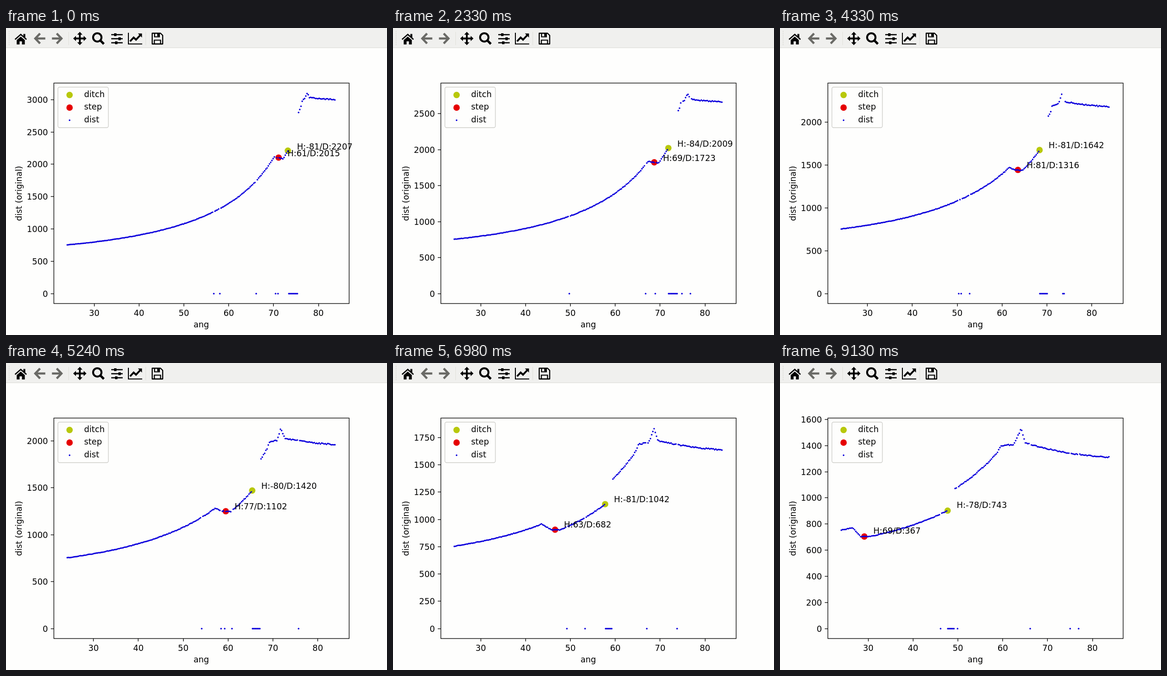
These frames come from a looping animation (800x644 px, 9170 ms). An HTML page with a canvas:

```html
<!DOCTYPE html>
<html lang="en">
<head>
<meta charset="utf-8">
<title>Distance scan</title>
<style>
  html, body { margin: 0; width: 100%; height: 100%; overflow: hidden; background: #fefefd; }
  canvas, svg { position: absolute; left: 0; top: 0; display: block; }
  .line { fill: none; stroke: #000; }
</style>
</head>
<body>
<canvas id="plot" width="800" height="644"></canvas>
<svg width="800" height="43" viewBox="0 0 800 43">
  <rect width="800" height="41.5" fill="#f0f0ee"/>
  <path d="M0 41.5H800" stroke="#dcdcd6"/>
  <path d="M6.5 6V38" stroke="#cfcfc8" stroke-dasharray="2 2"/>
  <path d="M131.5 8V36M293.5 8V36" stroke="#e0e0da"/>
  <!-- home -->
  <path class="line" d="M19 24L31 13.5L43 24" stroke-width="2.6"/>
  <path d="M36.5 12.5H40.5V21L36.5 17.5ZM22.5 25.3L31 18L39.5 25.3V34.5H33.5V28H28.5V34.5H22.5Z"/>
  <!-- back, forward -->
  <g fill="none" stroke="#6a6a66" stroke-width="4.6">
    <path d="M71.5 11.5L61.5 22L71.5 32.5M62 22H82.5"/>
    <path d="M106.5 11.5L116.5 22L106.5 32.5M116 22H96.5"/>
  </g>
  <!-- pan -->
  <path class="line" d="M155 12V32M145 22H165" stroke-width="3.8"/>
  <path d="M155 8L160.5 14H149.5ZM155 36L160.5 30H149.5ZM141 22L147 16.5V27.5ZM169 22L163 16.5V27.5Z"/>
  <!-- zoom -->
  <circle class="line" cx="191.7" cy="19.7" r="8.8" stroke-width="4"/>
  <path class="line" d="M198 26L205.5 33.5" stroke-width="4.8"/>
  <!-- sliders -->
  <path class="line" d="M221 14H245M221 22.5H245M221 31H245" stroke-width="2.3"/>
  <path d="M227 11h5v6h-5zM236 19.5h5v6h-5zM229 28h5v6h-5z"/>
  <!-- chart -->
  <path class="line" d="M257 10V33.5H286" stroke-width="2"/>
  <path class="line" d="M260.5 28L268 20L273 24.5L282 15" stroke-width="3.8"/>
  <path d="M277 11.5H285.5V20Z"/>
  <!-- save -->
  <path class="line" d="M307 11H324.5L329 15.5V33.5H307Z" stroke-width="2.3" stroke-linejoin="round"/>
  <path class="line" d="M312 11V18.5H322V11M311.5 33V25.5H324.5V33" stroke-width="2.2"/>
  <path d="M317.5 12H321V17.5H317.5Z"/>
</svg>
<script>
const LOOP = 9170, SCANS = 252, SCAN_MS = LOOP / SCANS;
const RAYS = 222, RAY_GAP = 0.27, SPAN = 59.85;
const FONT = '17.36px "DejaVu Sans", sans-serif';
const PAPER = '#fefefd', BLUE = '#0c00dc', RED = '#e60000', OLIVE = '#b8c80c';
const ctx = document.getElementById('plot').getContext('2d');

// The approach at a few scans: step and ditch readings, and the farthest echo.
const poses = [
  { scan: 0, stepH: 61, stepD: 2015, ditchH: -81, ditchD: 2207, peak: 3097 },
  { scan: 35, stepH: 60, stepD: 1893, ditchH: -84, ditchD: 2130, peak: 2972 },
  { scan: 96, stepH: 80, stepD: 1497, ditchH: -82, ditchD: 1826, peak: 2531 },
  { scan: 144, stepH: 77, stepD: 1102, ditchH: -80, ditchD: 1420, peak: 2134 },
  { scan: 171, stepH: 67, stepD: 852, ditchH: -83, ditchD: 1198, peak: 1989 },
  { scan: 211, stepH: 62, stepD: 551, ditchH: -78, ditchD: 920, peak: 1700 },
  { scan: 251, stepH: 69, stepD: 367, ditchH: -78, ditchD: 743, peak: 1531 }
];
const last = poses.length - 1;

function slope(name, i) {
  const a = poses[i], b = poses[i + 1];
  return (b[name] - a[name]) / (b.scan - a.scan);
}

function tangent(name, i) {
  if (i === 0) return 1.5 * slope(name, 0) - 0.5 * tangent(name, 1);
  if (i === last) return 1.5 * slope(name, last - 1) - 0.5 * tangent(name, last - 1);
  return (slope(name, i - 1) + slope(name, i)) / 2;
}

// Smooth curve through the poses.
function at(name, k) {
  let i = 0;
  while (i < last - 1 && k >= poses[i + 1].scan) i++;
  const a = poses[i], b = poses[i + 1], w = b.scan - a.scan;
  const u = (k - a.scan) / w, u2 = u * u, u3 = u2 * u;
  return (2 * u3 - 3 * u2 + 1) * a[name] + (u3 - 2 * u2 + u) * w * tangent(name, i)
    + (3 * u2 - 2 * u3) * b[name] + (u3 - u2) * w * tangent(name, i + 1);
}

function hash(n) {
  const s = Math.sin(n * 12.9898 + 4.1) * 43758.5453;
  return s - Math.floor(s);
}

const rad = deg => deg * Math.PI / 180;
// x is the distance ahead, y the depth below the sensor.
const point = (x, y) => ({ x, y, angle: Math.atan2(x, y) * 180 / Math.PI, dist: Math.hypot(x, y) });
const polar = (angle, dist) => point(dist * Math.sin(rad(angle)), dist * Math.cos(rad(angle)));

// Depth errors grow with distance.
const sag = x => 5.5 * Math.max(0, (x - 306) / 1000) ** 3;
const ground = x => 689 + 5 * (1 - Math.exp((306 - x) / 143)) + sag(x);

// Side view of the scene: ground, step, platform, ditch, box, wall.
function scene(k, start) {
  const stepX = at('stepD', k) - 24;
  const ditchX = at('ditchD', k) * 0.99 - 68;
  const level = 607 + sag(ditchX);
  const far = at('peak', k);
  const wallEnd = polar(start + SPAN + 0.1, far * 1.08 - 343);
  const boxX = wallEnd.x - 95;

  const step = point(stepX, 607 + sag(stepX) + 0.024 * stepX);
  const ditch = point(ditchX, level);
  const landing = point(697 * Math.tan(rad(ditch.angle + 1.1 + ditchX / 2000)), 697);
  const peak = polar(Math.acos(668 / far) * 180 / Math.PI, far);

  const path = [], from = polar(start, 754).x - 1;
  for (let i = 0; i <= 16; i++) {
    const x = from + (stepX + 2 - from) * i / 16;
    path.push(point(x, ground(x)));
  }
  path.push(polar(step.angle - 0.8, step.dist), step,
    point(stepX * 0.987 + 20, level), ditch,
    landing, point(boxX - 62, 697), point(boxX, 708), point(boxX + 40, level + 45),
    peak, point(wallEnd.x - 15, level - 7), wallEnd);
  return { path, step, ditch, landing, peak };
}

// Distance along a ray to the line from p to q.
function hit(angle, p, q) {
  const d = polar(angle, 1), vx = q.x - p.x, vy = q.y - p.y;
  return (p.x * vy - p.y * vx) / (d.x * vy - d.y * vx);
}

function echoes(k, start, { path, ditch, landing, peak }) {
  const holes = Array.from({ length: 5 }, (_, i) => 46 + 31 * hash(k * 7 + i));
  const dots = [];
  for (let i = 0; i < RAYS; i++) {
    const a = start + i * RAY_GAP;
    const inDitch = a > ditch.angle && a < landing.angle;
    if (inDitch || holes.some(h => Math.abs(a - h) < RAY_GAP / 2)) {
      dots.push([a, 0]);
      continue;
    }
    const n = path.findIndex((p, j) => j < path.length - 1 && p.angle <= a && a < path[j + 1].angle);
    if (n < 0) continue;
    const noise = 1 + (hash(k * 311 + i) - 0.5) * 0.006;
    dots.push([a, Math.min(hit(a, path[n], path[n + 1]) * noise, peak.dist)]);
  }
  return dots;
}

function disc(x, y, r, color) {
  ctx.fillStyle = color;
  ctx.beginPath();
  ctx.arc(x, y, r, 0, 7);
  ctx.fill();
}

function text(str, x, y, align = 'left') {
  ctx.fillStyle = '#000';
  ctx.textAlign = align;
  ctx.fillText(str, x, y);
}

function tick(x, y, dx, dy) {
  ctx.beginPath();
  ctx.moveTo(x, y);
  ctx.lineTo(x + dx, y + dy);
  ctx.stroke();
}

function drawLegend() {
  ctx.fillStyle = PAPER;
  ctx.strokeStyle = '#d0d0cc';
  ctx.lineWidth = 1.4;
  ctx.beginPath();
  ctx.roundRect(109, 124, 106, 85, 3.5);
  ctx.fill();
  ctx.stroke();
  [['ditch', OLIVE, 6.7], ['step', RED, 6.7], ['dist', BLUE, 1.7]].forEach(([name, color, r], i) => {
    disc(133.5, 140.5 + i * 26.5, r, color);
    text(name, 164, Math.floor(145 + i * 26.5));
  });
}

function drawAxes(px, py, top) {
  ctx.strokeStyle = '#000';
  ctx.lineWidth = 1.3;
  ctx.strokeRect(100.5, 115.5, 620, 462.5);
  for (let a = 30; a <= 80; a += 10) {
    tick(Math.floor(px(a)) + 0.5, 578, 0, 6);
    text(a, px(a), 604, 'center');
  }
  const gap = [200, 250, 500].find(g => top * 1.1 / g <= 9);
  for (let d = 0; d <= top * 1.05; d += gap) {
    const y = Math.floor(py(d));
    tick(100, y + 0.5, -6, 0);
    text(d, 88, y + 7, 'right');
  }
  text('ang', 410, 628, 'center');
  ctx.save();
  ctx.translate(33, 347);
  ctx.rotate(-Math.PI / 2);
  text('dist (original)', 0, 0, 'center');
  ctx.restore();
}

function draw(k) {
  const start = 24 + 0.15 * Math.sin(Math.PI * k / SCANS);
  const view = scene(k, start), { step, ditch } = view, top = view.peak.dist;
  const px = a => 128.7 + (a - start) * 563.6 / SPAN;
  const py = d => 557.2 - d * 420 / top;
  const label = (p, name) => text(
    `H:${Math.round(at(name + 'H', k))}/D:${Math.round(at(name + 'D', k))}`,
    Math.round(px(p.angle + 2)), Math.round(py(p.dist + 20)));

  ctx.fillStyle = PAPER;
  ctx.fillRect(0, 0, 800, 644);
  ctx.font = FONT;
  disc(px(ditch.angle), py(ditch.dist), 6.7, OLIVE);
  disc(px(step.angle), py(step.dist), 6.7, RED);
  echoes(k, start, view).forEach(([a, d]) => disc(px(a), py(d), 1.7, BLUE));
  drawAxes(px, py, top);
  label(ditch, 'ditch');
  label(step, 'step');
  drawLegend();
}

let shown = -1;
const begin = performance.now();
function frame() {
  const t = (performance.now() - begin) % LOOP;
  const k = Math.min(SCANS - 1, Math.floor((t + 9) / SCAN_MS));
  if (k !== shown) draw(shown = k);
  requestAnimationFrame(frame);
}
frame();
</script>
</body>
</html>
```
